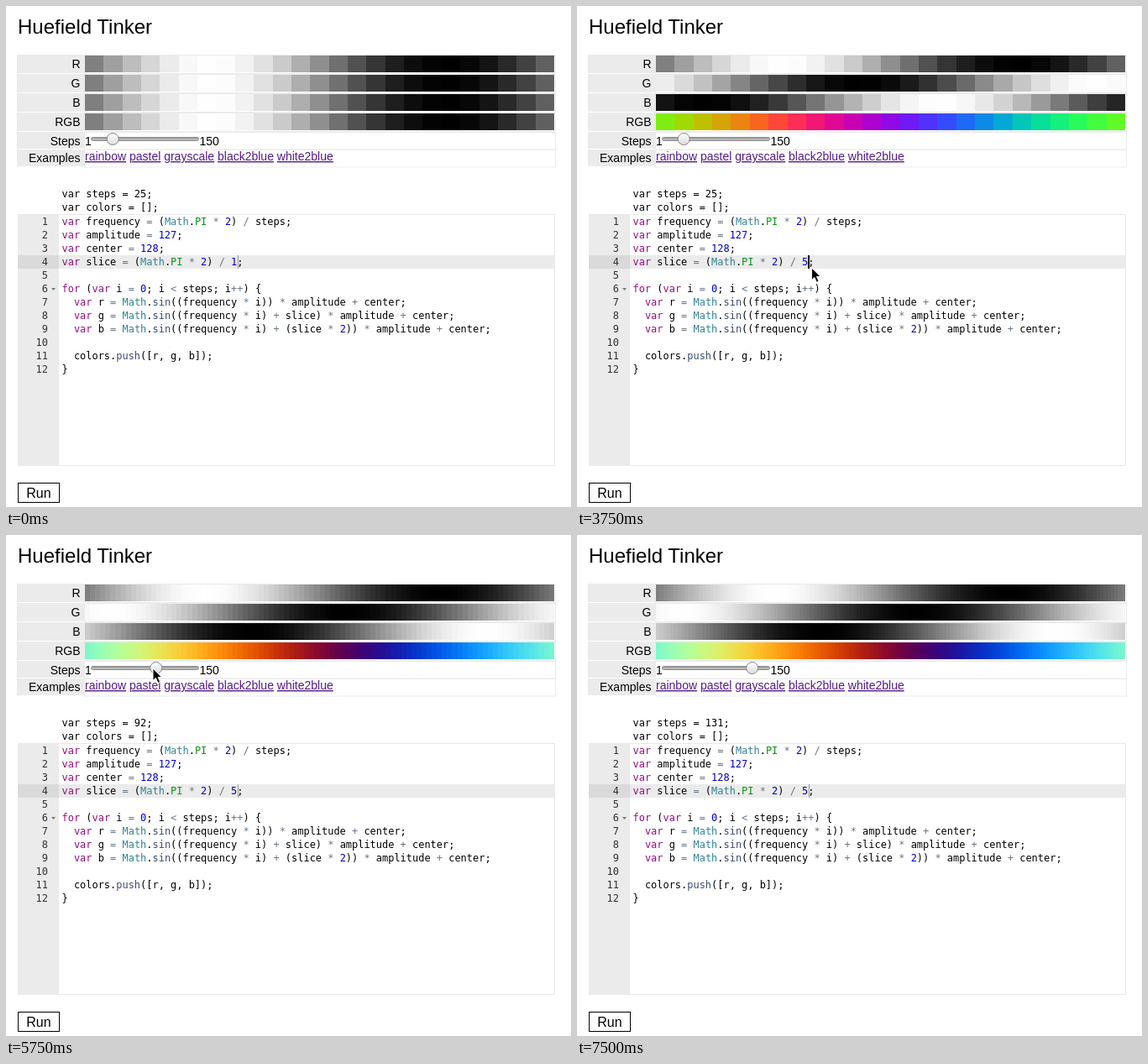
Animation, 673 px wide and 597 px high, one loop 8250 ms. Source, as an HTML page:

```html
<!DOCTYPE html>
<html lang="en">
<head>
<meta charset="utf-8">
<title>Huefield Tinker</title>
<style>
html, body { margin: 0; width: 100%; height: 100%; overflow: hidden; background: #fff; }
svg { display: block; }
text { font: 14px "Liberation Sans", Arial, sans-serif; white-space: pre; }
.title { font-size: 24px; }
.button { font-size: 16px; }
.link { fill: #551a8b; text-decoration: underline; }
.code { font: 11.96px "DejaVu Sans Mono", Monaco, monospace; }
.num { fill: #333; }
.key { fill: #930f80; }
.obj { fill: #318495; }
.const { fill: #06960e; }
.fn { fill: #3c4c72; }
.lit { fill: #0000cd; }
.op { fill: #687687; }
</style>
</head>
<body>
<svg width="673" height="597" viewBox="0 0 673 597">
  <defs>
    <linearGradient id="knobFill" x2="0" y2="1">
      <stop stop-color="#fff"/><stop offset="1" stop-color="#dcdcdc"/>
    </linearGradient>
    <linearGradient id="trackFill" x2="0" y2="1">
      <stop stop-color="#969696"/><stop offset="1" stop-color="#c8c8c8"/>
    </linearGradient>
  </defs>
  <g id="page"></g>
  <g id="swatches" shape-rendering="crispEdges"></g>
  <rect x="101.5" y="156.5" width="128" height="4" rx="2" fill="url(#trackFill)" stroke="#8c8c8c"/>
  <circle id="knob" cy="158.5" r="7" fill="url(#knobFill)" stroke="#858585"/>
  <text id="stepsLine" class="code" x="66.5" y="228"></text>
  <text id="sliceLine" class="code" x="66.5" y="309"></text>
  <rect id="caret" y="297" height="16"/>
  <path id="mouse" d="M0 0V14.5L3.4 11.4L6 17.3L8.6 16.2L6 10.4H10.6Z" stroke="#fff" stroke-width="1"/>
</svg>
<script>
const LOOP = 8250, TICK = 250, LEFT = 94, WIDTH = 559, CODE_X = 66.5, CHAR = 7.2;
const $ = id => document.getElementById(id);

// Each track lists [start time, value...]; a value holds until the next entry.
const steps = [[0, 25], [4750, 27], [5000, 35], [5250, 46], [5500, 70], [5750, 92],
  [6000, 106], [6250, 118], [6500, 131]];
const typed = [[0, "1"], [1750, ""], [2000, "3"], [3500, ""], [3750, "5"]];
const divisor = [[0, 1], [2000, 3], [4000, 5]];
const caret = [[0, "thin"], [1000, "bold"], [2500, ""], [3000, "bold"], [4250, ""], [4750, "thin"]];
const mouse = [[0], [250, 285, 238], [500, 286, 262], [750, 283, 287], [1000, 281, 303],
  [1250, 279.5, 312], [4000, 250, 286], [4250, 182, 216], [4500, 126, 154.5], [4750, 126, 156],
  [5000, 132, 157], [5250, 140, 158], [5500, 158, 158.5], [5750, 175, 159], [6000, 186, 159],
  [6250, 195, 159.5], [6500, 205, 159.5], [7000, 232, 180], [7250, 262, 212], [7500]];
const at = (track, t) => track.filter(k => k[0] <= t).pop().slice(1);

const rect = (x, y, w, h, fill, more = "") =>
  `<rect x="${x}" y="${y}" width="${w}" height="${h}" fill="${fill}" ${more}/>`;
const text = (x, y, s, cls = "", anchor = "start") =>
  `<text x="${x}" y="${y}" class="${cls}" text-anchor="${anchor}">${s}</text>`;

const kinds = ["key", "obj", "const", "fn", "lit", "op"];
const highlight = line => line.replace(
  /\b(var|for)\b|\b(Math)\b|\b(PI)\b|\b(sin|push)\b|(\d+)|([=*\/+<]+)/g,
  (s, ...groups) => {
    const kind = kinds[groups.slice(0, 6).findIndex(Boolean)];
    return `<tspan class="${kind}">${s.replace("<", "&lt;")}</tspan>`;
  });

// The fourth line is left empty here: it is the one being edited.
const code = `var frequency = (Math.PI * 2) / steps;
var amplitude = 127;
var center = 128;


for (var i = 0; i < steps; i++) {
  var r = Math.sin((frequency * i)) * amplitude + center;
  var g = Math.sin((frequency * i) + slice) * amplitude + center;
  var b = Math.sin((frequency * i) + (slice * 2)) * amplitude + center;

  colors.push([r, g, b]);
}`.split("\n");

function drawPage() {
  const grey = "#ebebeb";
  let out = text(14, 33, "Huefield Tinker", "title");
  ["R", "G", "B", "RGB", "Steps", "Examples"].forEach((label, i) => {
    const y = i < 4 ? 58 + 23 * i : 150 + 21 * (i - 4);
    const h = i < 4 ? 22 : 20;
    out += rect(13, y, 81, h, grey)
      + rect(LEFT - .5, y + .5, 561, h - (i < 4 ? 0 : -.5), "none", `stroke="${grey}"`)
      + text(88.5, i < 5 ? 74 + 23 * i : 186, label, "", "end");
  });
  out += text(94, 166, "1") + text(230.5, 166, "150");
  const links = ["rainbow", "pastel", "grayscale", "black2blue", "white2blue"];
  out += text(LEFT, 184, links.map(s => `<tspan class="link">${s}</tspan>`).join(" "));

  out += rect(14.5, 248.5, 639, 299, "#fff", `stroke="#e8e8e8"`)
    + rect(14, 249, 49, 299, grey)
    + rect(14, 297, 49, 16, "#dadada") + rect(63, 297, 591, 16, grey)
    + `<path d="M54 336h5l-2.5 3z" fill="#777"/>`
    + text(CODE_X, 244, "var colors = [];", "code");
  code.forEach((line, i) => {
    const y = 261 + 16 * i;
    out += text(50, y, i + 1, "code num", "end") + text(CODE_X, y, highlight(line), "code");
  });
  out += rect(14.5, 568.5, 49, 23, "#fff", `stroke="#000"`) + text(39, 586, "Run", "button", "middle");
  $("page").innerHTML = out;
}

function drawSwatches(count, div) {
  const slice = Math.PI * 2 / div;
  const edge = i => LEFT + Math.round(WIDTH * i / count);
  let out = "";
  for (let i = 0; i < count; i++) {
    const rgb = [0, 1, 2].map(c =>
      Math.floor(Math.sin(Math.PI * 2 / count * i + slice * c) * 127 + 128));
    const fills = [...rgb.map(v => [v, v, v]), rgb];
    fills.forEach((c, row) => {
      out += rect(edge(i), 59 + 23 * row, edge(i + 1) - edge(i), 20, `rgb(${c})`);
    });
  }
  $("swatches").innerHTML = out;
}

function drawState(t) {
  const [count] = at(steps, t), [digit] = at(typed, t), [blink] = at(caret, t);
  const [mx, my] = at(mouse, t);
  drawSwatches(count, at(divisor, t)[0]);
  $("knob").setAttribute("cx", 108 + .768 * count);
  $("stepsLine").textContent = `var steps = ${count};`;
  $("sliceLine").innerHTML = highlight(`var slice = (Math.PI * 2) / ${digit};`);

  const bold = blink === "bold";
  $("caret").setAttribute("x", Math.floor(CODE_X + CHAR * (28 + digit.length)) + (bold ? 0 : 1));
  $("caret").setAttribute("width", bold ? 2 : 1);
  $("caret").setAttribute("fill", bold ? "#000" : "#999");
  $("caret").style.display = blink ? "" : "none";

  $("mouse").style.display = mx ? "" : "none";
  if (mx) $("mouse").setAttribute("transform", `translate(${mx} ${my})`);
}

let shown = -1;
function frame() {
  const tick = Math.floor(performance.now() % LOOP / TICK);
  if (tick !== shown) drawState((shown = tick) * TICK);
  requestAnimationFrame(frame);
}
drawPage();
frame();
</script>
</body>
</html>
```
